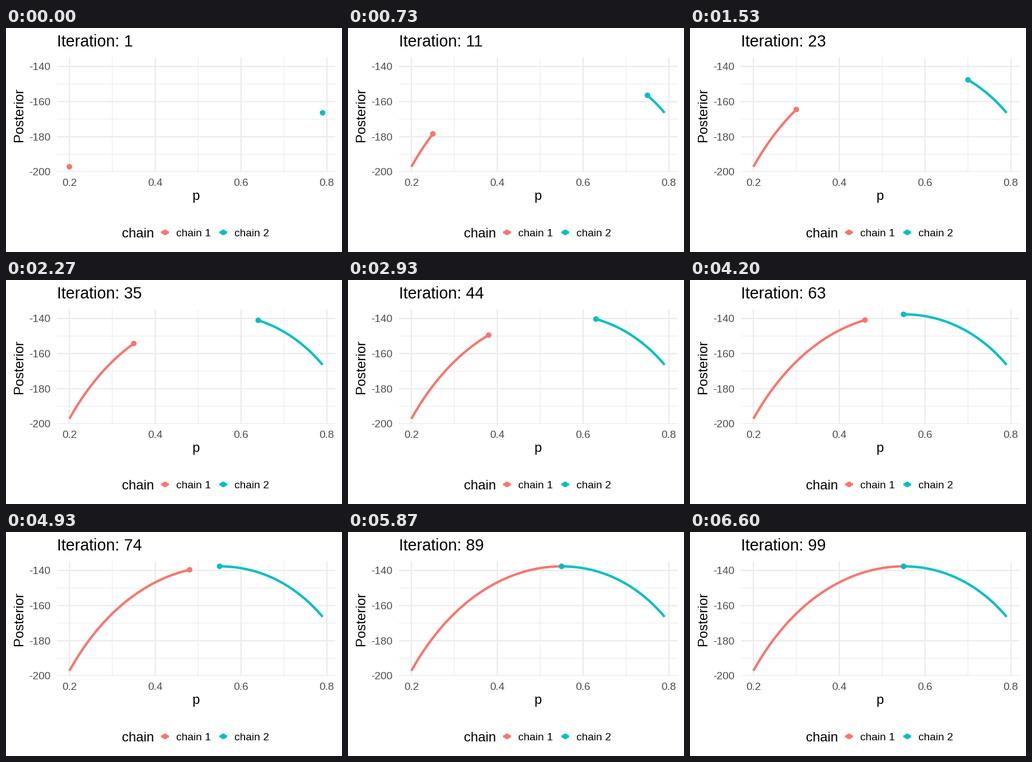
Recreate the animation shown at these times as a matplotlib script. Size 600 by 400 pixels, loop 6.67 s.

```python
import numpy as np
import matplotlib.pyplot as plt
from matplotlib.animation import FuncAnimation
from matplotlib.patches import Circle, Rectangle

W, H, DPI = 600, 400, 100
LOOP_MS, STEPS = 6670, 100
PT = 72 / DPI  # points per pixel
GRID, TICK_TEXT = "#EBEBEB", "#4D4D4D"
COLORS = ["#F8766D", "#00BFC4"]
LINE_W, DOT_R = 4.27, 4.97

plt.rcParams["font.family"] = "Liberation Sans"


def log_post(p):
    """Binomial log-likelihood: 110 successes in 200 trials."""
    return 110 * np.log(p) + 90 * np.log(1 - p)


# Panel edges in pixels and the data range with 5 % expansion
LEFT, RIGHT, TOP, BOTTOM = 90.6, 588.0, 52.0, 257.1


def expand(lo, hi):
    pad = 0.05 * (hi - lo)
    return lo - pad, hi + pad


X0, X1 = expand(0.20, 0.79)
Y0, Y1 = expand(log_post(0.20), log_post(0.55))


def px(p):
    return LEFT + (p - X0) / (X1 - X0) * (RIGHT - LEFT)


def py(v):
    return BOTTOM - (v - Y0) / (Y1 - Y0) * (BOTTOM - TOP)


def climb(iters, values):
    """Chain moving on a 0.01 lattice through the given waypoints."""
    p = np.round(np.interp(np.arange(1, STEPS + 1), iters, values), 2)
    return px(p), py(log_post(p))


CHAINS = [
    climb([1, 8, 12, 24, 33, 40, 54, 59, 64, 74, 80, 84],
          [.20, .24, .25, .30, .34, .37, .41, .44, .46, .48, .52, .55]),
    climb([1, 8, 12, 22, 24, 33, 40, 43, 54, 59],
          [.79, .76, .75, .71, .69, .64, .63, .63, .59, .55]),
]

fig = plt.figure(figsize=(W / DPI, H / DPI), dpi=DPI, facecolor="white")
ax = fig.add_axes([0, 0, 1, 1])
ax.set_xlim(0, W)
ax.set_ylim(H, 0)
ax.axis("off")


def stroke(xs, ys, color, width, z):
    line, = ax.plot(xs, ys, color=color, lw=width * PT, zorder=z, snap=False,
                    solid_capstyle="butt", solid_joinstyle="round")
    return line


def dot(x, y, color, z):
    return ax.add_patch(Circle((x, y), DOT_R, fc=color, lw=0, zorder=z))


def label(x, y, text, size, color="black", **kw):
    kw = {"ha": "left", "va": "baseline", **kw}
    return ax.text(x, y, text, fontsize=size * PT, color=color, **kw)


# Grid
panel = Rectangle((LEFT, TOP), RIGHT - LEFT, BOTTOM - TOP,
                  transform=ax.transData)


def grid(xs, ys, width):
    for x in xs:
        stroke([px(x)] * 2, [TOP, BOTTOM], GRID, width, 1)
    for y in ys:
        stroke([LEFT, RIGHT], [py(y)] * 2, GRID, width, 1).set_clip_path(panel)


x_ticks, y_ticks = [0.2, 0.4, 0.6, 0.8], [-140, -160, -180, -200]
grid([0.3, 0.5, 0.7], [-150, -170, -190], 1.16)
grid(x_ticks, y_ticks, 2.33)

# Axis text
for x in x_ticks:
    label(px(x), 282, f"{x:.1f}", 19.2, TICK_TEXT, ha="center")
for y in y_ticks:
    label(41.4, py(y) + 6.6, str(y), 19.2, TICK_TEXT)
label((LEFT + RIGHT) / 2, 307, "p", 24, ha="center")
label(30, (TOP + BOTTOM) / 2, "Posterior", 24, rotation=90,
      rotation_mode="anchor", ha="center")
title = label(LEFT, 33, "", 28.8)

# Legend
label(206.5, 374, "chain", 24)
for k, (x, color) in enumerate(zip([284, 388], COLORS), 1):
    stroke([x - 6.9, x + 6.9], [365, 365], color, LINE_W, 2)
    dot(x, 365, color, 3)
    label(x + 20, 372, f"chain {k}", 19.2)

trails = [stroke([], [], c, LINE_W, 4) for c in COLORS]
heads = [dot(0, 0, c, 5) for c in COLORS]


def update(i):
    title.set_text(f"Iteration: {i + 1}")
    for (xs, ys), trail, head in zip(CHAINS, trails, heads):
        trail.set_data(xs[:i + 1], ys[:i + 1])
        head.center = xs[i], ys[i]
    return [title, *trails, *heads]


anim = FuncAnimation(fig, update, frames=STEPS, interval=LOOP_MS / STEPS,
                     init_func=lambda: update(0), repeat=True, repeat_delay=0)
plt.show()
```
